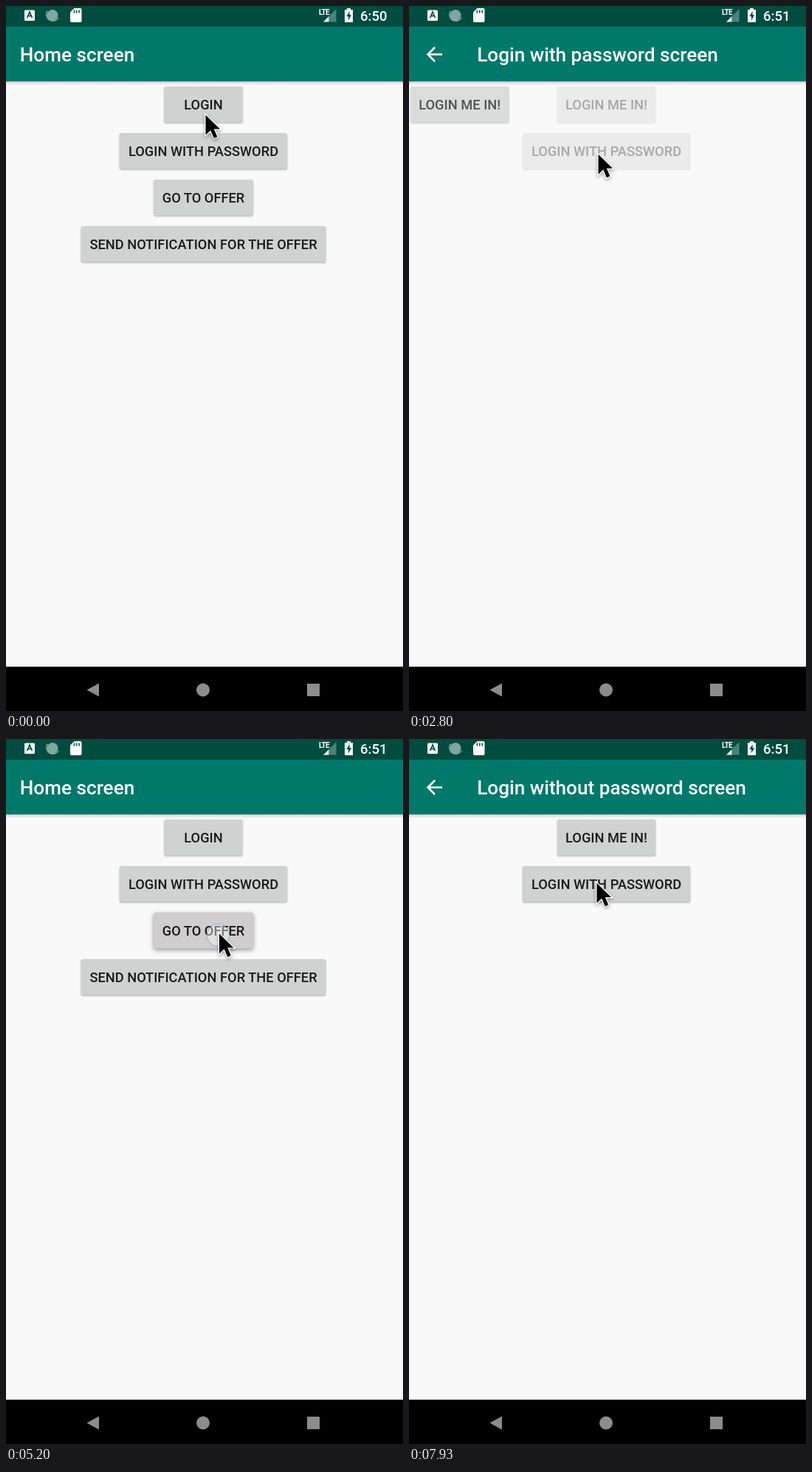
Animation, 538 px wide and 954 px high, one loop 8 s. Source, as an HTML page:

```html
<!DOCTYPE html>
<html lang="en">
<head>
<meta charset="utf-8">
<title>App navigation</title>
<style>
  html, body { margin: 0; width: 100%; height: 100%; overflow: hidden; background: #fafafa; }
  svg { display: block; width: 538px; height: 954px; }
  text { font-family: Roboto, sans-serif; font-weight: 500; }
  .button rect { fill: #d0d2d1; filter: drop-shadow(0 1.2px 1.2px rgba(0,0,0,.32)); }
  .button text, #toast text { font-size: 18.3px; text-anchor: middle; fill: #1a1a1a; }
  .button.pressed rect { fill: #cfcdcd; filter: drop-shadow(0 2px 3px rgba(0,0,0,.42)); }
  #toast text { font-weight: 400; }
  #title { font-size: 26.15px; fill: #fff; }
  #cursor { filter: drop-shadow(0 2px 2px rgba(0,0,0,.35)); }
</style>
</head>
<body>
<svg viewBox="0 0 538 954">
  <defs>
    <linearGradient id="shade" x2="0" y2="1">
      <stop stop-opacity=".32"/><stop offset=".4" stop-opacity=".12"/><stop offset="1" stop-opacity="0"/>
    </linearGradient>
  </defs>
  <rect width="538" height="954" fill="#f9f9f9"/>
  <g id="screens"></g>

  <rect y="101" width="538" height="6" fill="url(#shade)"/>
  <rect width="538" height="102" fill="#00796b"/>
  <rect width="538" height="28" fill="#004d40"/>
  <path id="back" d="M45 65.5H26M35 56L25.5 65.5L35 75" fill="none" stroke="#fff" stroke-width="2.6"/>
  <text id="title" y="75.4"></text>

  <g fill="#fff">
    <rect x="25" y="5.5" width="14" height="14.5" rx="1.5"/>
    <path d="M28.6 16L32 8L35.4 16M29.8 13.4H34.2" fill="none" stroke="#004d40" stroke-width="1.7"/>
    <circle cx="63" cy="12.5" r="7.5" fill="#7fa69f"/>
    <path d="M56 7A8.6 8.6 0 1 0 71 16" fill="none" stroke="#b3cac6" stroke-width="1.6" stroke-dasharray="1.6 1"/>
    <path d="M92.5 3H100.5Q102.5 3 102.5 5V20Q102.5 22 100.5 22H89Q87 22 87 20V8.5Z"/>
    <path d="M92.4 5.5V9.5M95.8 5.5V9.5M99.2 5.5V9.5" stroke="#004d40" stroke-width="1.5"/>
    <text x="424" y="12" font-size="10" style="font-weight:700" letter-spacing="-.8">LTE</text>
    <path d="M438 13.5L447.5 4V21.5H438Z" opacity=".3"/>
    <path d="M430 21.5L437.5 14V21.5Z"/>
    <path d="M459 5H462V3H467V5H470V22H459Z"/>
    <path d="M465.6 7L461.4 14H464V19.5L468 12H465.6Z" fill="#004d40"/>
    <text id="clock" x="480" y="20.2" font-size="18.5"></text>
  </g>

  <g id="toast">
    <rect x="190" y="797.5" width="154.5" height="64.5" rx="30" fill="#eee"/>
    <text x="267.3" y="837.5">myId: 1234</text>
  </g>

  <rect y="894" width="538" height="60"/>
  <g fill="#8c8c8c">
    <path d="M109.5 925.5L126 916.5V934.5Z"/>
    <circle cx="267" cy="925.5" r="9"/>
    <rect x="408" y="917" width="17" height="17"/>
  </g>

  <circle id="touch" r="15" fill="#fff" fill-opacity=".42" stroke="#8296c8" stroke-opacity=".42" stroke-width="1.6"/>
  <path id="cursor" d="M1.5 3V30L8.2 23.7L12.8 34.4L17.4 32.4L12.8 22H21Z" stroke="#fff" stroke-width="2.6" paint-order="stroke"/>
</svg>
<script>
const $ = id => document.getElementById(id);
const LOOP = 8000, FADE = 420;

// Each button: label, width, centre x
const MID = 267.5;
const screens = {
  home: { title: 'Home screen', buttons: [
    ['LOGIN', 106, MID], ['LOGIN WITH PASSWORD', 227, MID],
    ['GO TO OFFER', 134.5, MID], ['SEND NOTIFICATION FOR THE OFFER', 331.5, MID]] },
  login: { title: 'Login without password screen', buttons: [
    ['LOGIN ME IN!', 133, MID], ['LOGIN WITH PASSWORD', 227, MID]] },
  password: { title: 'Login with password screen', buttons: [['LOGIN ME IN!', 133, 68.7]] },
  offer: { title: 'Offer screen', buttons: [
    ['LOGIN &amp; APPLY', 151, MID], ['LOGIN WITH PASSWORD &amp; APPLY', 303, MID],
    ['APPLY FOR AN OFFER', 206, MID]] }
};

const visits = [[0, 'home'], [670, 'login'], [2530, 'password'], [3780, 'home'], [5320, 'offer'], [7010, 'login']];

// Press start, release, screen, button index
const presses = [
  [460, 600, 'home', 0], [2330, 2470, 'login', 1], [3600, 3720, 'password', 0],
  [5140, 5260, 'home', 2], [6790, 6930, 'offer', 0]
];

const cursorPath = [
  [0, 269, 144.5], [660, 269, 144.5], [1040, 332, 216], [1750, 332, 216],
  [2150, 255.5, 198], [2780, 255.5, 198], [3450, 101.5, 146], [4100, 101.5, 146],
  [4900, 287.5, 260.5], [5560, 287.5, 260.5], [6110, 238, 178], [6200, 241.5, 153],
  [6480, 250, 135], [7250, 250, 135], [7880, 253, 192], [LOOP, 253, 192]
];

function buttonMarkup([label, width, cx], i) {
  const y = 109 + 63 * i;
  return `<g class="button"><rect x="${cx - width / 2}" y="${y}" width="${width}" height="48.5" rx="2.6"/>` +
    `<text x="${cx}" y="${y + 31}">${label}</text></g>`;
}

for (const screen of Object.values(screens)) {
  screen.node = document.createElementNS('http://www.w3.org/2000/svg', 'g');
  screen.node.innerHTML = screen.buttons.map(buttonMarkup).join('');
  $('screens').append(screen.node);
}

const clamp = v => Math.max(0, Math.min(1, v));
const ramp = (t, start, length) => clamp((t - start) / length);
const smooth = p => p * p * (3 - 2 * p);

function cursorAt(t) {
  const i = cursorPath.findIndex(stop => stop[0] > t);
  const [t0, x0, y0] = cursorPath[i - 1], [t1, x1, y1] = cursorPath[i];
  const p = smooth((t - t0) / (t1 - t0));
  return [x0 + (x1 - x0) * p, y0 + (y1 - y0) * p];
}

function drawScreens(t) {
  const index = visits.findLastIndex(visit => visit[0] <= t);
  const [start, name] = visits[index];
  const previous = index > 0 ? visits[index - 1][1] : null;
  const p = ramp(t, start, FADE);
  for (const [key, screen] of Object.entries(screens)) {
    const alpha = key === name ? (previous ? clamp(p * 1.15) : 1) : key === previous ? 1 - p : 0;
    screen.node.style.opacity = alpha;
    screen.node.style.display = alpha ? '' : 'none';
    [...screen.node.children].forEach((button, i) => button.classList.toggle('pressed',
      presses.some(([down, up, on, which]) => on === key && which === i && t >= down && t < up + 100)));
  }
  $('title').textContent = screens[name].title;
  $('title').setAttribute('x', name === 'home' ? 18.7 : 92.2);
  $('back').style.display = name === 'home' ? 'none' : '';
}

function draw(t) {
  drawScreens(t);
  const [x, y] = cursorAt(t);
  $('cursor').setAttribute('transform', `translate(${x} ${y})`);
  $('touch').setAttribute('transform', `translate(${x} ${y + 5})`);
  $('touch').style.display = presses.some(([down, up]) => t >= down && t < up) ? '' : 'none';
  $('clock').textContent = t < 1400 ? '6:50' : '6:51';
  $('toast').style.opacity = ramp(t, 5450, 250) * (1 - ramp(t, 7450, 250));
}

const origin = performance.now();
function tick() {
  draw((performance.now() - origin) % LOOP);
  requestAnimationFrame(tick);
}
tick();
</script>
</body>
</html>
```
